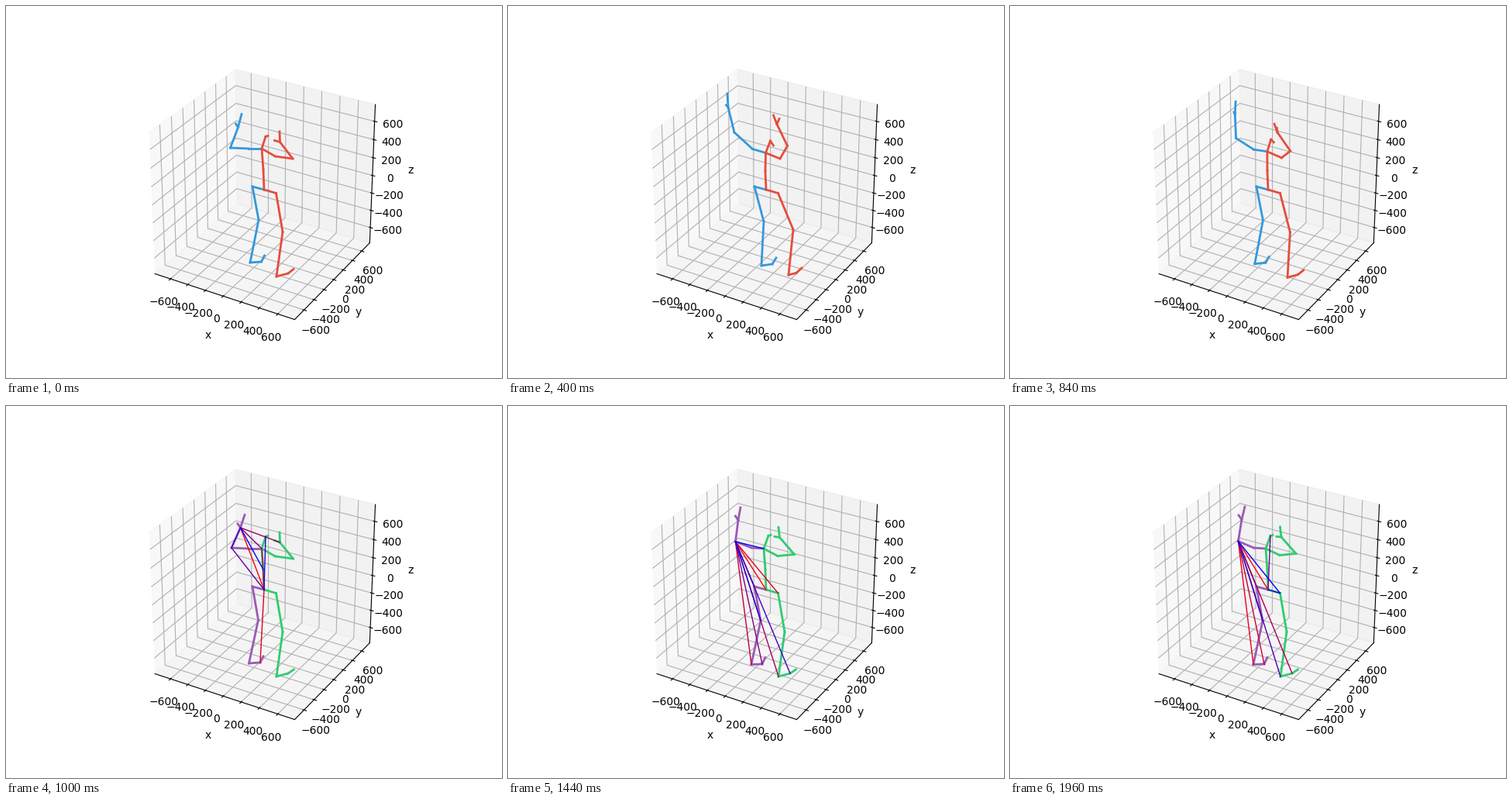
Write a matplotlib script that moves like this. It is 640 px wide and 480 px high and loops after 2 s.

```python
import numpy as np
import matplotlib.pyplot as plt
from matplotlib.animation import FuncAnimation

FRAMES, STEP = 50, 40
SWITCH = 1000  # ms: observed motion ends, predicted motion begins

# Poses in stage pixels; each later pose lists only the joints that moved.
STAND = dict(
    hip=(333, 237), spine=(332, 211), neck=(330, 184), head=(335, 168.5), crown=(338, 167.5),
    lhip=(318, 233), lknee=(326, 276), lankle=(315, 331), lfoot=(329.5, 330), ltoe=(333.5, 322),
    rhip=(348.5, 241.5), rknee=(357, 291.5), rankle=(349, 349), rfoot=(364, 345), rtoe=(371, 339.5),
    lsho=(313, 184), lelb=(289.5, 183), lwri=(299.5, 156.5), lhand=(304, 139.5), lthumb=(296.5, 152),
    rsho=(347.5, 194), relb=(370, 197), rwri=(353.5, 175.5), rhand=(353, 162), rthumb=(346.5, 173.5))

RAISED = STAND | dict(
    spine=(332, 213), neck=(332.5, 189.5), head=(338.5, 174), crown=(342.5, 180),
    lknee=(330, 278), lankle=(327, 335), lfoot=(341, 333), ltoe=(346, 325),
    rknee=(368, 288.5), rankle=(362, 347), rfoot=(372, 344.5), rtoe=(379, 338),
    lsho=(315.5, 184.5), lelb=(292, 163), lwri=(284, 130.5), lhand=(283, 113), lthumb=(281.5, 128),
    rsho=(351, 197), relb=(360.5, 180.5), rwri=(347, 152.5), rhand=(342.5, 141), rthumb=(350, 145.5))

SWAY = RAISED | dict(
    neck=(333, 190), head=(338, 174.5), crown=(342, 181),
    lknee=(327.5, 277), lankle=(318.5, 333.5), lfoot=(332, 331.5), ltoe=(337, 324),
    rknee=(365, 292), rankle=(363.5, 351), rfoot=(376, 347.5), rtoe=(383, 341.5),
    lsho=(315.5, 186), lwri=(283, 130.5), lhand=(281, 113), lthumb=(282.5, 128),
    rsho=(352, 197), relb=(356.5, 181), rwri=(340, 154.5), rhand=(334, 144.5), rthumb=(343, 147))

LOWERED = STAND | dict(
    lknee=(325.5, 276), lankle=(313.5, 332), lfoot=(328, 331), ltoe=(332, 323),
    lelb=(291, 183), lwri=(302.5, 157), lhand=(308, 140.5), lthumb=(299, 152),
    relb=(370.5, 197), rwri=(353.5, 176), rhand=(353, 163), rtoe=(371.5, 340))

LIFTED = LOWERED | dict(
    head=(336, 167.5), crown=(339, 166.5), lknee=(326, 277), lankle=(314, 333.5),
    lfoot=(328, 333), ltoe=(332, 324.5), lsho=(314.5, 183), lelb=(293.5, 175),
    lwri=(297, 147.5), lhand=(300, 131), lthumb=(293.5, 142),
    rsho=(348, 193.5), relb=(369.5, 191.5), rwri=(350.5, 169.5), rhand=(349, 156.5), rthumb=(344, 168.5))

REST = LIFTED | dict(
    lelb=(294.5, 174.5), lwri=(299, 146.5), lhand=(303, 130), lthumb=(295, 141),
    rsho=(348, 192.5), relb=(369, 190.5), rwri=(350, 169), rhand=(348.5, 156))

OBSERVED = [0, 400, 680, 1000], [STAND, RAISED, SWAY, LOWERED]
PREDICTED = [1000, 1440, 1960], [LOWERED, LIFTED, REST]

CHAINS = ["hip rhip rknee rankle rfoot rtoe", "hip lhip lknee lankle lfoot ltoe",
          "hip spine neck head crown", "neck lsho lelb lwri lhand", "lwri lthumb",
          "neck rsho relb rwri rhand", "rwri rthumb"]
BONES = [pair for c in CHAINS for pair in zip(c.split(), c.split()[1:])]

# Strongest links first, from the given start time on.
LINKS = [
    (1000, "lwri-hip hip-lfoot neck-hip lwri-rwri lwri-neck hip-lelb lwri-lelb hip-head lwri-spine"),
    (1200, "lelb-hip lelb-rhip lelb-lankle lelb-rankle lelb-lfoot lelb-lhip lelb-rfoot "
           "lelb-lknee lelb-neck"),
    (1600, "lelb-hip lelb-lankle lelb-lfoot lelb-rhip lelb-rankle lelb-rfoot lelb-lhip "
           "lelb-lknee hip-head hip-rhip"),
    (1880, "lelb-hip lelb-lankle lelb-lfoot lelb-rfoot lelb-lhip hip-head lelb-rankle "
           "lelb-lknee hip-rhip lelb-rhip"),
]


def spline(times, values):
    """Monotone cubic through the key values, as a function of time."""
    t, v = np.array(times, float), np.array(values, float)
    h = np.diff(t)[:, None, None]
    s = np.diff(v, axis=0) / h
    m = np.concatenate([s[:1], np.zeros_like(s[1:]), s[-1:]])
    a, b = s[:-1], s[1:]
    same = a * b > 0
    m[1:-1] = np.where(same, 2 * a * b / np.where(same, a + b, 1), 0)

    def at(x):
        i = min(np.searchsorted(t, x, side="right") - 1, len(h) - 1)
        u, d = (x - t[i]) / h[i], h[i]
        w = u * u * (3 - 2 * u)
        return (v[i] * (1 - w) + v[i + 1] * w
                + d * u * (1 - u) * ((1 - u) * m[i] - u * m[i + 1]))
    return at


JOINTS = list(STAND)


def track(keys):
    return spline(keys[0], [[pose[j] for j in JOINTS] for pose in keys[1]])


observed, predicted = track(OBSERVED), track(PREDICTED)

fig = plt.figure(figsize=(6.4, 4.8), dpi=100)
ax = fig.add_subplot(projection="3d")
lim = 750 * 25 / 24
ax.set(xlim=(-lim, lim), ylim=(-lim, lim), zlim=(-lim, lim), xlabel="x", ylabel="y", zlabel="z")
ax.set_box_aspect((1, 1, 1), zoom=np.sqrt(3) / 1.82946)
ax.view_init(elev=30, azim=-60)
for axis in (ax.xaxis, ax.yaxis, ax.zaxis):
    axis.set_ticks(range(-600, 601, 200))

stage = fig.add_axes([0, 0, 1, 1])
stage.set(xlim=(0, 640), ylim=(480, 0))
stage.axis("off")
bones = [stage.plot([], [], lw=2)[0] for _ in BONES]
links = [stage.plot([], [], lw=1)[0] for _ in range(10)]


def connect(line, pose, a, b, color):
    line.set_data(*zip(pose[a], pose[b]))
    line.set_color(color)


def draw(i):
    t = i * STEP
    early = t < SWITCH
    pose = dict(zip(JOINTS, (observed if early else predicted)(t)))
    left, right = ("#3498db", "#e74c3c") if early else ("#9b59b6", "#2ecc71")
    for line, (a, b) in zip(bones, BONES):
        connect(line, pose, a, b, left if b[0] == "l" else right)

    active = [names.split() for start, names in LINKS if start <= t]
    pairs = active[-1] if active else []
    for k, line in enumerate(links):
        line.set_visible(k < len(pairs))
        if k < len(pairs):
            u = k / (len(pairs) - 1)
            connect(line, pose, *pairs[k].split("-"), (1 - u, 0, u))
    return bones + links


anim = FuncAnimation(fig, draw, frames=FRAMES, interval=STEP, repeat=True, repeat_delay=0)
plt.show()
```
